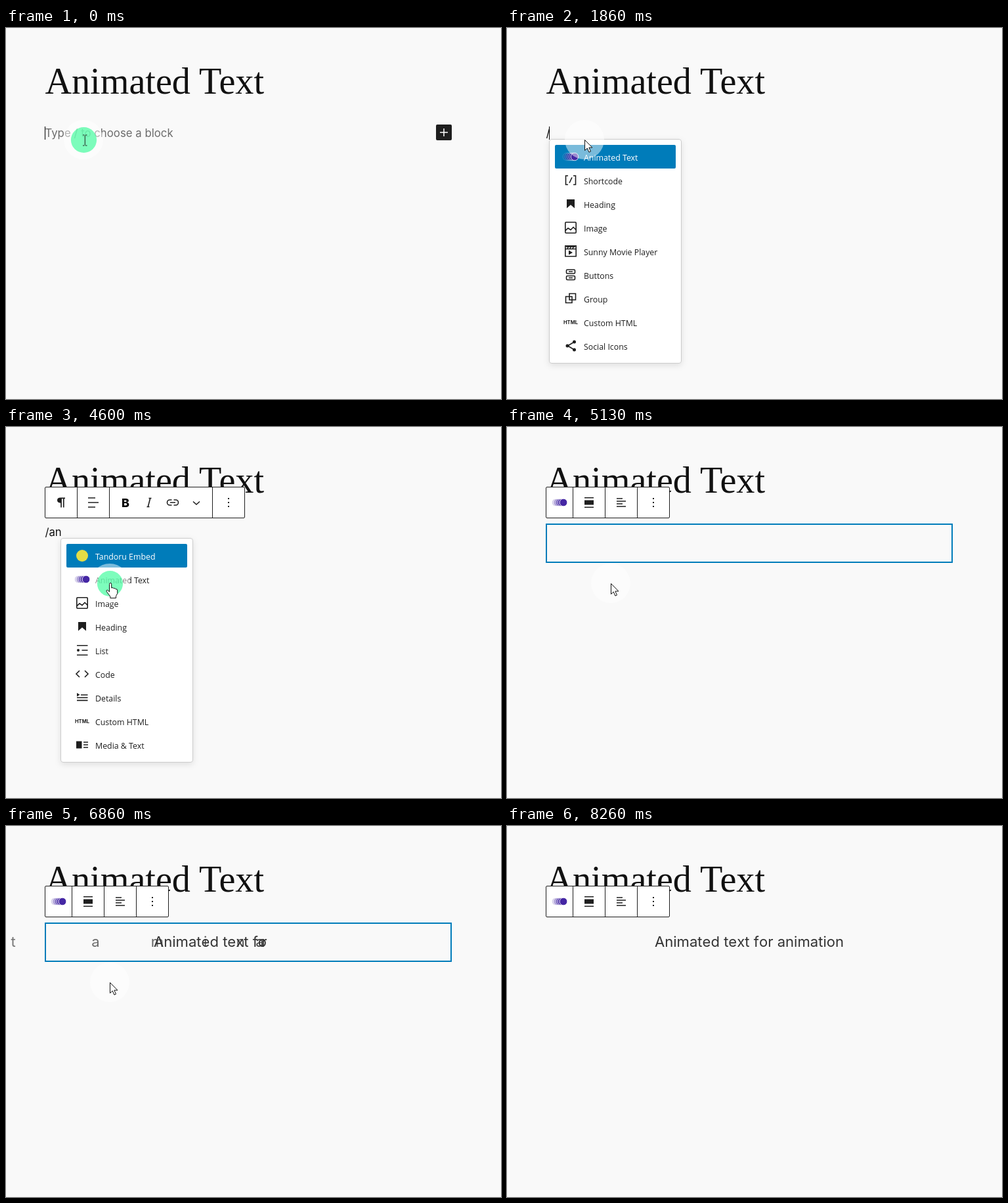
Recreate the animation shown at these times as an HTML page. Size 754 by 565 pixels, loop 8.67 s.

```html
<!DOCTYPE html>
<html lang="en">
<head>
<meta charset="utf-8">
<title>Animated Text block</title>
<style>
  html, body { margin: 0; width: 100%; height: 100%; overflow: hidden; background: #f9f9f9; }
  svg { display: block; }
  .title { font: 56.2px "Liberation Serif", serif; fill: #111; }
  .body { font: 16.8px Inter, sans-serif; fill: #111; }
  .row { font: 12.35px "Open Sans", sans-serif; fill: #1e1e1e; }
  .active { fill: #fff; }
  .letter { font: 22.08px Inter, sans-serif; fill: #333; }
  .html { font: 700 7.6px Inter, sans-serif; text-anchor: middle; }
  .line { fill: none; stroke: #1e1e1e; stroke-width: 1.6; }
  .panel { fill: #fff; stroke: #1e1e1e; }
  .menu { fill: #fff; stroke: #ccc; filter: drop-shadow(0 3px 5px rgba(0, 0, 0, .1)); }
</style>
</head>
<body>
<svg width="754" height="565" viewBox="0 0 754 565">
  <rect width="754" height="565" fill="#f9f9f9"/>
  <text class="title" x="59.4" y="100">Animated Text</text>
  <g id="prompt">
    <text class="body" x="59.4" y="166" style="fill:#6c6c6c">Type / to choose a block</text>
    <rect x="655" y="147" width="24" height="24" rx="2" fill="#1e1e1e"/>
    <path d="M661 159h12M667 153v12" stroke="#fff" stroke-width="1.5"/>
  </g>
  <text id="typed" class="body" x="59.4" y="166"></text>
  <path id="caret" d="M.5 150v20" stroke="#000"/>
  <g id="firstMenu"></g>
  <g id="secondMenu"></g>
  <g id="paragraphBar"></g>
  <rect id="outline" x="60" y="148" width="618" height="58" fill="none" stroke="#007cba" stroke-width="2"/>
  <g id="blockBar"></g>
  <g id="letters"></g>
  <g id="pointer">
    <circle r="30" fill="#fff" opacity=".48"/>
    <circle id="press" cx=".5" cy=".5" r="19.6" fill="#4cfda3" opacity=".72"/>
    <path id="beam" d="M-1 -7h2.5M3 -7h2.5M-1 9h2.5M3 9h2.5M2.3 -6.5v15" fill="none" stroke="#222"/>
    <path id="arrow" d="M.5 .5v16l3.8-3.4 2.6 6 2.6-1.1-2.6-5.9h5z" fill="#fff" stroke="#111"/>
    <path id="hand" d="M-.5 13V1.5q0-2 1.6-2t1.6 2V7q3-1.2 3.4.9 2.6-.9 3 1 2.6-.4 2.6 2v4.6l-2.2 4.2v2.8H.8V20l-5.5-7.3q-.9-2.4 1.3-2.4z"
      fill="#fff" stroke="#111"/>
  </g>
</svg>
<script>
const LOOP = 8670, FRAME = 1000 / 15;
const ui = {};
document.querySelectorAll('[id]').forEach(el => ui[el.id] = el);

const line = d => `<path class="line" d="${d}"/>`;
const solid = d => `<path d="${d}" fill="#1e1e1e"/>`;
const icons = {
  motion: [0, 1, 2, 3, 4].map(i =>
    `<circle cx="${-6 + 3 * i}" r="5.8" fill="#4527a4" opacity="${[.2, .3, .45, .65, 1][i]}" stroke="#fff" stroke-width=".8"/>`).join(''),
  embed: '<circle r="9" fill="#e3dc46"/>',
  shortcode: line('M-4-7h-3.5v13.5h3.5M4-7h3.5v13.5h-3.5M2-4.5l-4 8.5'),
  heading: solid('M-6-7h12v13.5l-6-5.2-6 5.2z'),
  image: line('M-7-8.2h14q1.2 0 1.2 1.2v14q0 1.2-1.2 1.2h-14q-1.2 0-1.2-1.2v-14q0-1.2 1.2-1.2zM-8 4.5l4-3.7 4 2.7 4-4.2 4 3.9'),
  video: line('M-8.2-8.2h16.4v16h-16.4zM-8-3.5h16M-5-4l2-4M-1-4l2-4M3-4l2-4M-7-7h14') + solid('M-3-1.5v7l6-3.5z'),
  buttons: line('M-5-8h10q1.5 0 1.5 1.5v3q0 1.5-1.5 1.5h-10q-1.5 0-1.5-1.5v-3q0-1.5 1.5-1.5zM-5 1.5h10q1.5 0 1.5 1.5v3q0 1.5-1.5 1.5h-10q-1.5 0-1.5-1.5v-3q0-1.5 1.5-1.5zM-3-5h6M-3 4.5h6'),
  group: line('M-2-7.5h9.5v9.5h-9.5zM-7.5-3h9.5v9.5h-9.5z'),
  html: '<text class="html" y="3" fill="#1e1e1e">HTML</text>',
  social: line('M5.5-6l-10 6 10 6') + solid('M3-6a2.5 2.5 0 0 1 5 0a2.5 2.5 0 0 1-5 0M-7.5 0a2.5 2.5 0 0 1 5 0a2.5 2.5 0 0 1-5 0M3 6a2.5 2.5 0 0 1 5 0a2.5 2.5 0 0 1-5 0'),
  list: line('M-8-7.2h16.5M-.5 0h9M-8 7.2h16.5') + solid('M-8 0a2 2 0 0 1 4 0a2 2 0 0 1-4 0'),
  code: line('M-4-5l-5 5 5 5M4-5l5 5-5 5'),
  details: line('M-2-4h10.5M-8 .2h16.5M-8 4.4h16.5') + solid('M-8-7v5.6l4.5-2.8z'),
  media: solid('M-9-5.5h8.5v11h-8.5z') + line('M2-4h7M2 0h7M2 4h7'),
  pilcrow: solid('M6-7.5v1.7h-1.4v13.3h-1.7v-13.3h-2v13.3h-1.7v-6.7q-5.2-.2-5.2-4.2 0-4.1 5.2-4.1z'),
  align: line('M-8-7h11M-8 0h16M-8 7h11'),
  bold: '<text y="6.5" text-anchor="middle" font-family="Inter, sans-serif" font-size="18" font-weight="800">B</text>',
  italic: line('M-.5-6.5h4M-3.5 6.5h4M1.7-6.5l-3.4 13'),
  link: line('M-1.5-4h-3a4 4 0 0 0 0 8h3M1.5-4h3a4 4 0 0 1 0 8h-3M-4 0h8'),
  chevron: line('M-5-1.5l5 4.5 5-4.5'),
  more: solid('M-1-7h2v2h-2zM-1-1h2v2h-2zM-1 5h2v2h-2z'),
  wide: line('M-7-7.2h14M-7 7.2h14') + solid('M-7-3.5h14v7h-14z'),
  left: line('M-7-6h9M-7-2h14M-7 2h9M-7 6h14')
};
const icon = (name, x, y) => `<g transform="translate(${x} ${y})">${icons[name]}</g>`;

const menu = rows => '<rect class="menu" x=".5" y="169.5" width="201" height="341" rx="3.5"/>' +
  '<rect x="9" y="178" width="184" height="36" rx="2" fill="#007cba"/>' +
  rows.map(([name, label], i) => icon(name, 33, 196 + 36 * i) +
    `<text class="row${i ? '' : ' active'}" x="53" y="${202 + 36 * i}">${label}</text>`).join('');

const toolbar = (width, dividers, items) =>
  `<rect class="panel" x="59.5" y="91.5" width="${width}" height="47" rx="1.5"/>` +
  dividers.map(x => `<path d="M${x + .5} 92v46" stroke="#1e1e1e"/>`).join('') +
  items.map(([name, x]) => icon(name, x, 115)).join('');

ui.firstMenu.innerHTML = menu([
  ['motion', 'Animated Text'], ['shortcode', 'Shortcode'], ['heading', 'Heading'],
  ['image', 'Image'], ['video', 'Sunny Movie Player'], ['buttons', 'Buttons'],
  ['group', 'Group'], ['html', 'Custom HTML'], ['social', 'Social Icons']]);
ui.secondMenu.innerHTML = menu([
  ['embed', 'Tandoru Embed'], ['motion', 'Animated Text'], ['image', 'Image'],
  ['heading', 'Heading'], ['list', 'List'], ['code', 'Code'],
  ['details', 'Details'], ['html', 'Custom HTML'], ['media', 'Media &amp; Text']]);
ui.firstMenu.setAttribute('transform', 'translate(64 0)');
ui.secondMenu.setAttribute('transform', 'translate(83 0)');
ui.paragraphBar.innerHTML = toolbar(304, [108, 157, 314], [['pilcrow', 84], ['align', 133],
  ['bold', 182], ['italic', 218], ['link', 254], ['chevron', 290], ['more', 339]]);
ui.blockBar.innerHTML = toolbar(188, [100, 149, 198],
  [['motion', 80], ['wide', 125], ['left', 174], ['more', 223]]);

// Each glyph rests at its own advance inside a centred line.
const phrase = [...'Animated text for animation'];
const pen = document.createElement('canvas').getContext('2d');
pen.font = '22.08px Inter, sans-serif';
const advance = c => pen.measureText(c).width;
let penX = 369 - phrase.reduce((sum, c) => sum + advance(c), 0) / 2;
const letters = [];
for (const c of phrase) {
  if (c !== ' ') {
    const el = document.createElementNS('http://www.w3.org/2000/svg', 'text');
    el.setAttribute('class', 'letter');
    el.setAttribute('y', 184);
    el.textContent = c;
    ui.letters.append(el);
    letters.push({ el, x: penX });
  }
  penX += advance(c);
}

const show = (name, on) => ui[name].style.display = on ? '' : 'none';
const within = (t, ...spans) => spans.some(([from, to]) => t >= from && t < to);
const glide = (t, from, to) => {
  const p = Math.min(1, Math.max(0, (t - from) / (to - from)));
  return p * p * (3 - 2 * p);
};

function draw(t) {
  const frameTime = Math.floor((t + 7) / FRAME) * FRAME;
  const inserted = t >= 4730;
  const text = inserted || t < 800 ? '' : t < 1930 ? '/' : t < 2060 ? '/a' : '/an';

  show('prompt', t < 800);
  ui.typed.textContent = text;
  show('caret', within(t, [0, 330], [800, 1330], [1860, 2600], [3130, 3660]));
  ui.caret.setAttribute('transform', `translate(${[59, 64, 74, 84][text.length]} 0)`);
  show('firstMenu', within(t, [860, 2130]));
  show('secondMenu', within(t, [2130, 4730]));
  show('paragraphBar', within(t, [3930, 4730]));
  show('blockBar', inserted);
  show('outline', inserted && t < 8260);

  letters.forEach(({ el, x }, i) => {
    const stepsLeft = Math.max(0, (5922 + 74 * i - frameTime) / 74);
    el.setAttribute('x', x - (2 * stepsLeft) ** 2.3);
    el.setAttribute('opacity', inserted ? Math.max(0, 1 - .048 * stepsLeft) : 0);
  });

  // The pointer goes to the menu item, then leaves through the bottom edge.
  const toItem = glide(frameTime, 3870, 4400), away = glide(frameTime, 7200, 7867);
  const x = 118 + 40 * toItem - 27 * away;
  const y = 170 + 68 * toItem + 360 * away;
  const overItem = y > 180 && t < 5130;
  ui.pointer.setAttribute('transform', `translate(${x} ${y})`);
  show('press', within(t, [0, 200], [4600, 5130]));
  show('beam', t < 1330);
  show('hand', overItem);
  show('arrow', t >= 1330 && !overItem);
}

const start = performance.now();
(function tick() {
  draw((performance.now() - start) % LOOP);
  requestAnimationFrame(tick);
})();
</script>
</body>
</html>
```
